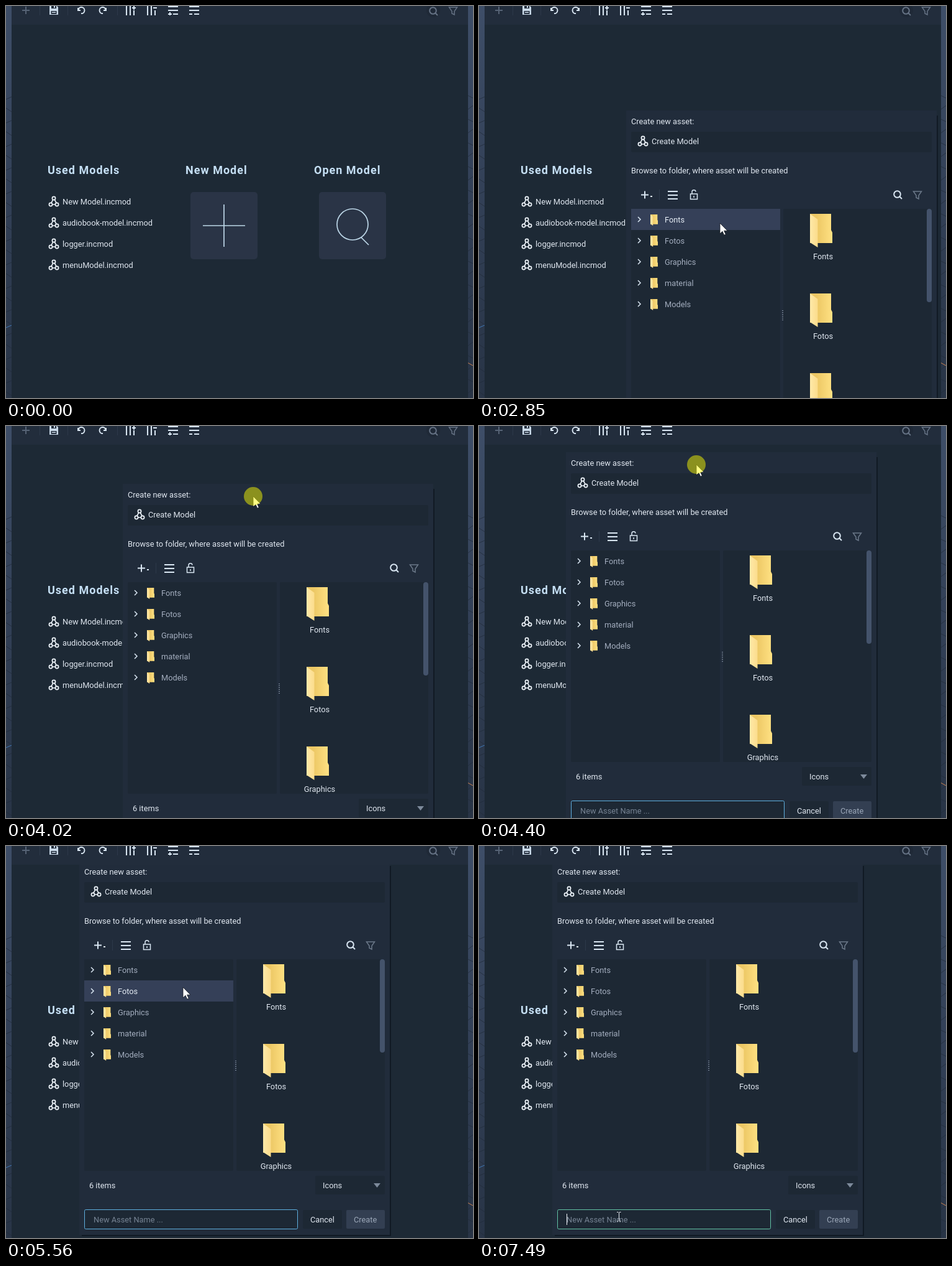
Recreate the animation shown at these times as an HTML page. Size 752 by 630 pixels, loop 8 s.

```html
<!DOCTYPE html>
<html lang="en">
<head>
<meta charset="utf-8">
<title>Create model dialog</title>
<style>
  html, body { margin: 0; width: 100%; height: 100%; overflow: hidden; background: #1d2935; }
  svg { display: block; }
  text { font: 12.8px Roboto, sans-serif; fill: #e0e7f0; }
  .title { font-size: 18px; font-weight: 700; letter-spacing: 1px; fill: #c5dff4; }
  .line { fill: none; stroke: #d9e6f2; stroke-width: 2; }
  .dim { stroke: #566375; }
  .thin { stroke: #bdd7e8; stroke-width: 1.7; }
  .sep { stroke: #2d394a; stroke-width: 1; }
  .row rect { fill: none; }
  .row text { fill: #a4aebf; }
  .row.hover rect { fill: #354058; }
  .row.hover text { fill: #e6edf5; }
</style>
</head>
<body>
<svg width="752" height="630" viewBox="0 0 752 630">
  <defs>
    <linearGradient id="sky" x2="0" y2="1">
      <stop stop-color="#3e4e68"/><stop offset=".45" stop-color="#334158"/><stop offset="1" stop-color="#283446"/>
    </linearGradient>
    <linearGradient id="gold"><stop offset=".3" stop-color="#ecc764"/><stop offset="1" stop-color="#ffe183"/></linearGradient>
    <linearGradient id="flap"><stop stop-color="#ffe9a8"/><stop offset="1" stop-color="#fbdc8c"/></linearGradient>
    <g id="folder">
      <path d="M0 0H34V26L36 30V47H0Z" fill="url(#gold)"/>
      <path d="M0 0L12.500 9V54L0 46Z" fill="url(#flap)"/>
    </g>
    <g id="model" fill="none" stroke="#eef4fa" stroke-width="1.7">
      <path d="M-1.200 -2.800L-4.200 2.700M1.200 -2.800L4.200 2.700M-2.600 5H2.600"/>
      <circle cy="-5" r="2.600"/><circle cx="-5" cy="5" r="2.600"/><circle cx="5" cy="5" r="2.600"/>
    </g>
    <g id="lens"><circle cx="-.5" cy="-.5" r="5.300"/><path d="M3.300 3.300L7 7"/></g>
    <path id="funnel" d="M-6.500 -6H6.500L2 .5V6L-2 4V.5Z" stroke-width="1.500"/>
    <path id="turn" d="M-5 -4V0H-1M-4.500 -.5A5 5 0 1 1 0 5"/>
  </defs>

  <rect width="752" height="630" fill="url(#sky)"/>
  <path id="grid" fill="none" stroke="#202b3a" opacity=".75"/>
  <path d="M0 517L9 513" stroke="#3f78b5"/>
  <path d="M743 573L752 578" stroke="#c9824f"/>
  <rect x="9" width="735" height="630" fill="#1d2935"/>

  <text class="title" x="67" y="270">Used Models</text>
  <text class="title" x="289" y="270">New Model</text>
  <text class="title" x="496" y="270">Open Model</text>
  <g id="recent"></g>
  <rect id="tile" x="297" y="299" width="108" height="108" rx="5"/>
  <path class="line thin" d="M351 319V387M317 353H385"/>
  <rect x="504" y="299" width="108" height="108" rx="5" fill="#2a3446"/>
  <g class="line thin"><circle cx="558" cy="351" r="25"/><path d="M572 372L584 384"/></g>

  <g id="dialog">
    <rect x="241" y="176" width="498" height="595" fill="#111a24"/>
    <rect x="237" y="168" width="500" height="601" fill="#212c3b"/>
    <text x="245" y="190">Create new asset:</text>
    <rect id="kind" x="245" y="202" width="484" height="33" rx="2"/>
    <use href="#model" x="264" y="217"/>
    <text x="278" y="222">Create Model</text>
    <text x="245" y="269">Browse to folder, where asset will be created</text>

    <path class="line" d="M261 303.500H273M267 297.500V309.500M276 306H279"/>
    <path class="line sep" d="M290.500 295V312"/>
    <path class="line" stroke-width="1.500" d="M304 298H320M304 304H320M304 310H320"/>
    <path class="line" style="stroke-width:1.500" d="M340.500 302H351.500V310.500H340.500ZM343 302V299A3 3 0 0 1 349 298.500M346 305V308"/>
    <use class="line" href="#lens" x="674" y="303"/>
    <use class="line" style="stroke:#6b7889;stroke-width:1.500" href="#funnel" x="706" y="304"/>

    <rect x="245" y="326" width="240" height="340" rx="2" fill="#1d2834"/>
    <rect x="490" y="326" width="239" height="340" rx="2" fill="#1d2834"/>
    <path d="M489 489V507" stroke="#8491a2" stroke-width="2" stroke-dasharray="1 2"/>
    <rect x="721" y="326" width="8" height="150" rx="4" fill="#44536b"/>
    <g id="rows"></g>
    <g id="cells" text-anchor="middle"></g>

    <text x="253" y="694">6 items</text>
    <rect x="617" y="674" width="112" height="30" rx="2" fill="#1d2834"/>
    <text x="629" y="694">Icons</text>
    <path d="M711 686H722L716.500 693Z" fill="#7d8a9b"/>
    <rect id="field" x="245.500" y="728.500" width="343" height="31" rx="2" fill="#1d2834"/>
    <text x="260" y="749" style="fill:#768393">New Asset Name ...</text>
    <path id="caret" d="M260.500 735V753" stroke="#f2f6fa"/>
    <rect x="597" y="729" width="63" height="30" rx="2" fill="#1d2834"/>
    <text x="609" y="749">Cancel</text>
    <rect x="667" y="729" width="62" height="30" rx="2" fill="#333f52"/>
    <text x="679" y="749" style="fill:#9ba7b8">Create</text>
  </g>

  <rect x="9" width="735" height="30" fill="#222d3c"/>
  <path class="line dim" d="M26 7H38M32 1V13"/>
  <path class="line sep" d="M54.500 0V15M99.500 0V15M179.500 0V15"/>
  <path d="M70 0H82L84 2V14H70Z" fill="#c9d9e8"/>
  <path d="M73 0H81V4H73ZM72.500 8H81.500V13H72.500Z" fill="#222d3c"/>
  <path d="M77 0H79V3H77ZM74 9.500H80V11H74Z" fill="#c9d9e8"/>
  <use class="line" href="#turn" x="121" y="7"/>
  <use class="line" href="#turn" transform="translate(156 7) scale(-1 1)"/>
  <path class="line" d="M194 0V15M200 0V15M206 7V15M203 3H209M206 0V6
    M228 0V15M234 0V15M240 7V15M237 3H243
    M261 1H277M261 7H277M269 13H277M261 13H267M264 10V15
    M295 1H311M295 7H311M303 13H311M295 13H300"/>
  <circle cx="688" cy="7" r="11" fill="#1f2937"/>
  <use class="line" style="stroke:#657284" href="#lens" x="688" y="8"/>
  <use class="line" style="stroke:#657284;stroke-width:1.500" href="#funnel" x="720" y="8"/>

  <g id="pointer" stroke="#10161d" stroke-linejoin="round">
    <path id="arrow" fill="#fff" stroke-width=".8" d="M0 0V17L4 13.200L6.700 19.200L9.300 18L6.600 12.200H12Z"/>
    <path id="hand" fill="#fff" d="M-2 1.500Q0 -1.500 2 1.500V7L8 8.500Q10 9.500 10 12V15L7.500 21.500H-1.500L-6 13.500Q-6 10.500 -2 13Z
      M2 7V11M5 8V11.500M8 9V12"/>
    <path id="beam" fill="none" stroke="#e8eef4" d="M-1 -6.500H1.500M3 -6.500H5.500M2.500 -6V7.500M-1 8H1.500M3 8H5.500"/>
  </g>
  <circle id="press" r="15" fill="#ff0" fill-opacity=".48"/>
</svg>
<script>
const $ = id => document.getElementById(id);
const show = (id, on) => $(id).setAttribute('visibility', on ? 'visible' : 'hidden');
const move = (id, x, y) => $(id).setAttribute('transform', `translate(${x} ${y})`);

const folders = ['Fonts', 'Fotos', 'Graphics', 'material', 'Models'];
$('recent').innerHTML = ['New Model', 'audiobook-model', 'logger', 'menuModel'].map((name, i) =>
  `<use href="#model" x="77" y="${314 + 34 * i}"/><text x="91" y="${319 + 34 * i}">${name}.incmod</text>`).join('');
$('rows').innerHTML = folders.map((name, i) => `<g class="row" transform="translate(245 ${326 + 34 * i})">
  <rect width="240" height="34"/><path class="line" style="stroke-width:1.500" d="M11 13L15 17L11 21"/>
  <use href="#folder" transform="translate(31 9) scale(.333)"/><text x="54" y="22">${name}</text></g>`).join('');
$('cells').innerHTML = folders.slice(0, 3).map((name, i) =>
  `<use href="#folder" x="533" y="${334 + 128 * i}"/><text x="554" y="${407 + 128 * i}">${name}</text>`).join('');

let lines = '';
for (let y = 150; y < 630; y += 38) {
  lines += `M0 ${y}l9 -4M0 ${y + 14}l9 6M744 ${y - 6}l8 4M744 ${y + 16}l8 -6`;
}
$('grid').setAttribute('d', lines);

// Pointer moves: start, end, number of poses, first pose, last pose, ease-out power
const moves = [
  [140, 900, 11, 611, 620, 394, 488, 1.2],
  [980, 1450, 7, 391, 476, 364, 370, 1.2],
  [2850, 3620, 11, 388, 349, 447, 188, 1.5],
  [4020, 4400, 6, 398, 113, 350, 62, 1.3],
  [4400, 4710, 5, 350, 62, 338, 49, 1.3],
  [4940, 5170, 4, 335, 48, 328, 44, 1],
  [5560, 6250, 10, 285, 227, 223, 595, 1.5],
];

function pointerAt(t) {
  const [start, end, poses, x0, y0, x1, y1, power] = moves.findLast(m => t >= m[0]) || moves[0];
  const last = poses - 1;
  const step = Math.min(last, Math.floor((t - start) / (end - start) * last + .15));
  const p = 1 - (1 - Math.max(0, step) / last) ** power;
  return [Math.round(x0 + (x1 - x0) * p), Math.round(y0 + (y1 - y0) * p)];
}

function draw(t) {
  const [x, y] = pointerAt(t);
  const [dx, dy] = t < 4020 ? [0, 0] : t < 5250 ? [x - 447, y - 188] : [-119, -144];
  const open = t >= 2400, dragging = t >= 3790 && t < 5250;
  const localY = y - dy;
  const onTile = t < 2470 && t >= 980 && y < 407;
  const onField = t >= 5560 && localY >= 728;

  show('dialog', open);
  move('dialog', dx, dy);
  $('tile').setAttribute('fill', onTile ? '#364058' : '#2a3446');
  $('kind').setAttribute('fill', open && localY >= 202 && localY < 235 ? '#354058' : '#1d2834');
  const hovered = t >= 2470 ? Math.floor((localY - 326) / 34) : -1;
  document.querySelectorAll('.row').forEach((row, i) => row.classList.toggle('hover', i === hovered));

  const focused = t >= 6500;
  $('field').setAttribute('stroke', focused ? '#62c3a5' : '#5fb0e0');
  show('caret', focused && (t < 6960 || t >= 7490));

  move('pointer', x, y);
  show('arrow', t >= 140 && !onTile && !onField);
  show('hand', onTile);
  show('beam', onField);
  move('press', x, y);
  show('press', dragging || (t >= 6500 && t < 6650));
  // Hidden parts must not leak out of the closed dialog
  if (!open) show('caret', false);
}

const begin = performance.now();
function frame() {
  draw((performance.now() - begin) % 8000);
  requestAnimationFrame(frame);
}
frame();
</script>
</body>
</html>
```
